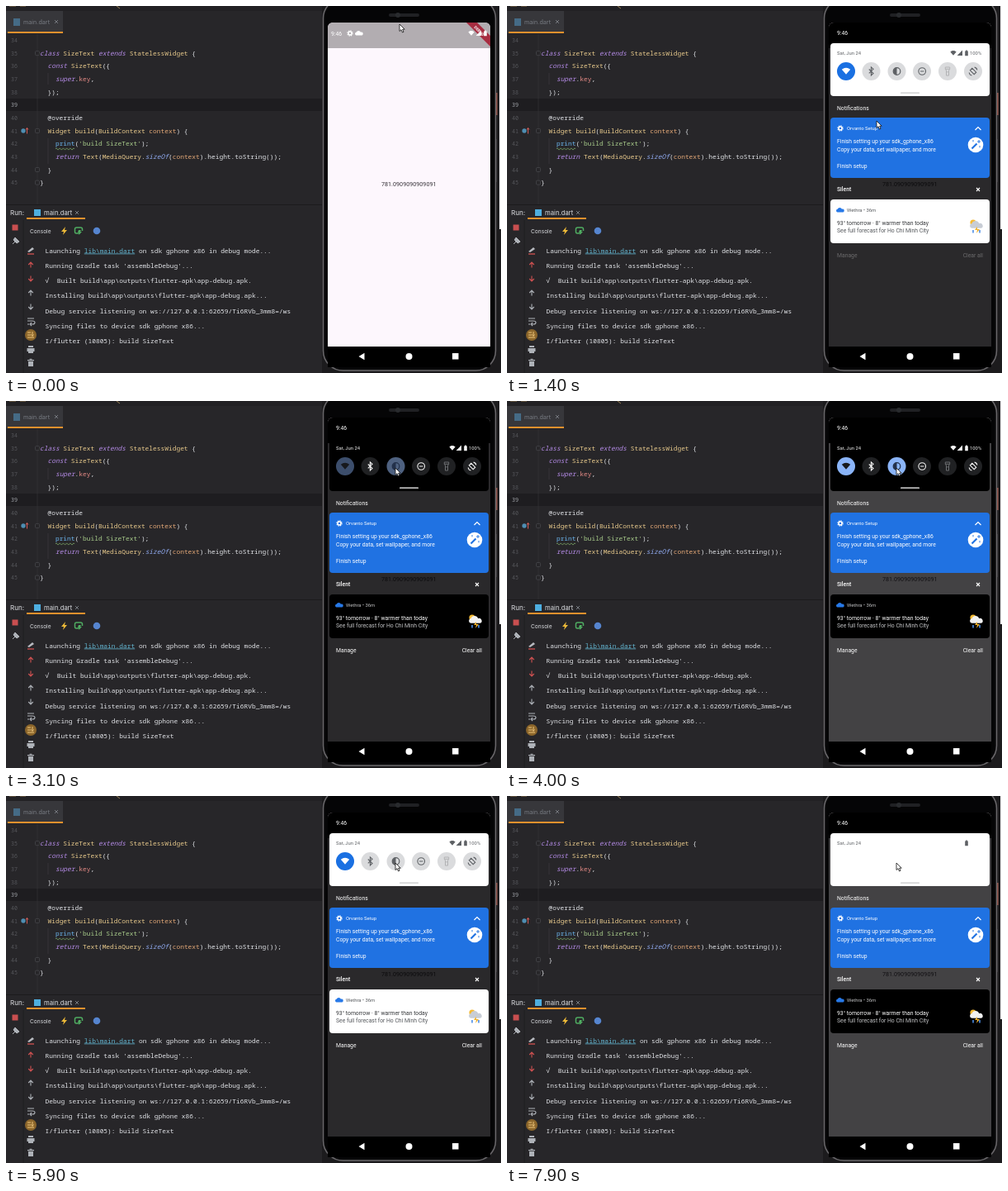
Recreate the animation shown at these times as an HTML page. Size 600 px wide and 444 px high, loop 8 s.

```html
<!DOCTYPE html>
<html lang="en">
<head>
<meta charset="utf-8">
<title>Phone theme toggle beside a code editor</title>
<style>
html, body { margin: 0; width: 100%; height: 100%; overflow: hidden; background: #272629; }
svg { display: block; width: 600px; height: 444px; }
text { white-space: pre; }
.mono { font: 500 7.88px "Noto Sans Mono", "DejaVu Sans Mono", monospace; fill: #e2e4e8; }
.num { font: 6.6px "Noto Sans Mono", monospace; fill: #55565b; }
.ui { font: 8.1px Inter, sans-serif; fill: #dcdee2; }
.k { fill: #b48be6; font-style: italic; }
.t { fill: #e8ca8c; }
.f { fill: #6cb6f0; }
.m { fill: #8fa9ee; font-style: italic; }
.s { fill: #a9cd8b; }
.r { fill: #e58a86; }
.o { fill: #e3a877; }
.line { fill: none; stroke: #aeb2b8; stroke-width: 1.1; }
.phone text { font: 6.8px Roboto, sans-serif; }
.phone .small { font-size: 5.9px; }
.phone .mid { font-weight: 500; }
.white { fill: #fff; }
.panel { fill: var(--panel); }
.ink { fill: var(--ink); }
.inkline { fill: none; stroke: var(--ink); stroke-width: 1.1; }
.card { fill: var(--card); }
.cardink { fill: var(--cardInk); }
.cardsub { fill: var(--cardSub); }
</style>
</head>
<body>
<svg viewBox="0 0 600 444">
  <defs>
    <clipPath id="screen"><path d="M390 412V27q0-7 7-7H580q7 0 7 7V412Z"/></clipPath>
    <path id="cloud" d="M-3.6 2.4a1.9 1.9 0 0 1 .2-3.7A2.9 2.9 0 0 1 2-1.2a1.8 1.8 0 0 1 1.6 3.6Z"/>
    <path id="wifi" d="M0 3.8L-5.2-2.3Q0-6 5.2-2.3Z"/>
    <path id="signal" d="M3 3V-3.4L-3.4 3Z"/>
    <path id="battery" d="M-1.8 3.2V-2.6H-.8V-3.6H.8V-2.6H1.8V3.2Z"/>
    <g id="gear" fill="none" stroke="currentColor">
      <circle r="2" stroke-width="1.5"/>
      <circle r="3.1" stroke-width="1.2" stroke-dasharray="1.35 1.08"/>
    </g>
    <path id="cross" d="M-2-2L2 2M2-2L-2 2"/>
    <path id="up" d="M0 3.5V-3M-2.8 0L0-3L2.8 0"/>
  </defs>

  <rect width="600" height="444" fill="#272629"/>
  <rect width="600" height="6" fill="#222124"/>
  <path d="M4 0h8M17 0h7M134 0l4 3" stroke="#9a8054"/>
  <rect y="6" width="69" height="27" fill="#37373b"/>
  <rect x="2" y="31" width="67" height="2" fill="#e8912d"/>
  <rect x="9" y="15" width="8" height="9" fill="#456b86"/>
  <text class="ui" x="21" y="22" style="font-size:7.2px;fill:#777b82">main.dart</text>
  <use href="#cross" x="61" y="19" stroke="#74777d"/>
  <rect y="112" width="383" height="15" fill="#1e1d20"/>
  <path d="M38 34V240" stroke="#353438" stroke-width=".7"/>
  <path d="M51 81v14M51 160v31" stroke="#3d3c41" stroke-width=".7"/>
  <g id="code"></g>
  <path d="M60 173q1-2.2 2.1 0t2.1 0 2.1 0 2.1 0 2.1 0 2.1 0 2.1 0 2.1 0 2.1 0 2.1 0 2.1 0" fill="none" stroke="#7ea968" stroke-width=".8"/>
  <circle cx="21" cy="151" r="2.7" fill="#4e8eb2"/>
  <path d="M25.5 154.5v-7M24 149.5l1.5-2 1.5 2" fill="none" stroke="#d05c58"/>

  <rect y="240" width="383" height="1" fill="#1b1a1c"/>
  <rect x="25" y="256" width="71" height="2" fill="#e8912d"/>
  <text class="ui" x="5" y="253">Run:</text>
  <rect x="34" y="246" width="8" height="8" fill="#4daee0"/>
  <text class="ui" x="46" y="253" style="font-size:7.7px">main.dart</text>
  <use href="#cross" x="86" y="250" stroke="#777b82"/>
  <path d="M21 259V444" stroke="#1f1e21"/>
  <text class="ui" x="29" y="275" style="font-size:6.6px">Console</text>
  <path d="M72 267l-5 6h3l-1 4 5-6h-3Z" fill="#edba38"/>
  <path d="M90 275h-5q-1.5 0-1.5-2v-3q0-2 2-2h5q2 0 2 2v2" fill="none" stroke="#50ad62" stroke-width="1.5"/>
  <path d="M88 271l-1 3h2l-1 3 4-4h-2l1-2Z" fill="#50ad62"/>
  <circle cx="110" cy="272" r="4.3" fill="#5685cf"/>
  <rect x="7.5" y="264.5" width="7" height="7" fill="#c94f50"/>
  <path d="M8 288l3-3M9 282l5 5M11 280l5 5-3 2-4-4Z" fill="#aeb2b8" stroke="#aeb2b8"/>
  <path d="M26 297l6-5 2 2-6 4Z" fill="#b8bbc1"/><path d="M26 300h8" stroke="#d25252" stroke-width="1.3"/>
  <g class="line">
    <g stroke="#d25252"><use href="#up" x="30" y="313"/><use href="#up" transform="translate(30 330) scale(1 -1)"/></g>
    <use href="#up" x="30" y="347"/><use href="#up" transform="translate(30 364) scale(1 -1)"/>
    <path d="M26 378h8M26 381h6q3 0 3 2t-3 2h-2M31 383l-2 2 2 2M26 385h2"/>
  </g>
  <circle cx="30" cy="398" r="7" fill="#8c662b"/>
  <path d="M26 395h4M26 398h4M26 401h8M32 394v5M30.5 397.5l1.5 2 1.5-2" fill="none" stroke="#ecc47b"/>
  <path d="M27 411h6v2h-6ZM25.5 414h9v4h-9ZM27 417h6v3h-6Z" fill="#aeb2b8"/>
  <path d="M26 428h8v1.3h-8ZM28.5 426.7h3v1h-3ZM27 430h6v6h-6Z" fill="#aeb2b8"/>
  <g id="log"></g>

  <g class="phone">
    <rect x="383" width="217" height="444" fill="#1c1b1d"/>
    <rect x="598" width="2" height="270" fill="#f4f2f4"/>
    <rect x="593" y="105" width="2.5" height="27" fill="#9c5549"/>
    <rect x="593" y="161" width="2" height="52" fill="#343235"/>
    <rect x="384.5" y="-9" width="209" height="450" rx="24" fill="#09090a" stroke="#6b696c" stroke-width="1.5"/>
    <rect x="387" y="-6" width="204" height="444" rx="21" fill="#050506"/>
    <rect x="464" y="9" width="37" height="4" rx="2" fill="#202124"/>
    <circle cx="475" cy="11" r="3" fill="#292b2e"/>

    <g clip-path="url(#screen)">
      <rect x="390" y="20" width="197" height="392" fill="#fdf7fd"/>
      <text x="455" y="218" fill="#38343a" style="font-size:7.2px">781.0909090909091</text>
      <rect x="390" y="20" width="197" height="31" fill="#b2adb1"/>
      <path d="M558 20h13L587 36v13Z" fill="#a72c40"/>
      <text class="white" transform="translate(567 26) rotate(45)" style="font-size:4.7px;font-weight:700">DEBUG</text>
      <g id="bar" class="white" color="#fff">
        <text x="394" y="35.5">9:46</text>
        <use href="#gear" x="417" y="33"/><use href="#cloud" x="428" y="33"/>
        <use href="#wifi" transform="translate(564 33) scale(.7)"/>
        <use href="#signal" x="573" y="33"/><use href="#battery" x="581" y="33"/>
      </g>
      <rect id="scrim" x="390" y="20" width="197" height="392" fill="#020203"/>
      <g id="head">
        <rect x="390" y="20" width="197" height="31" fill="#000"/>
        <text class="white" x="400" y="35.3">9:46</text>
      </g>

      <g id="panel">
        <rect class="panel" x="392" y="45" width="193" height="64" rx="4"/>
        <text class="ink small" x="400" y="59">Sat, Jun 24</text>
        <g id="net" class="ink">
          <use href="#wifi" transform="translate(541 57) scale(.7)"/><use href="#signal" x="549" y="57"/>
        </g>
        <use href="#battery" class="ink" x="557" y="57"/>
        <text id="percent" class="ink small" x="561" y="59">100%</text>
        <g id="discs" fill="var(--disc)">
          <circle cx="441.5" cy="79" r="11"/><circle cx="503" cy="79" r="11"/>
          <circle cx="534" cy="79" r="11"/><circle cx="565" cy="79" r="11"/>
          <circle cx="472.5" cy="79" r="11"/>
        </g>
        <circle id="wifiDisc" cx="411" cy="79" r="11" fill="var(--active)"/>
        <circle id="themeDisc" cx="472.5" cy="79" r="11" fill="#8ab4f8"/>
        <use href="#wifi" x="411" y="79" fill="var(--activeInk)"/>
        <g id="icons">
          <path class="inkline" d="M438.8 76.5l5.2 5-2.6 2.4v-10l2.6 2.4-5.2 5"/>
          <circle cx="472.5" cy="79" r="4.3" fill="none" stroke="var(--themeInk)" stroke-width="1.2"/>
          <path d="M472.5 74.7a4.3 4.3 0 0 0 0 8.6Z" fill="var(--themeInk)"/>
          <path class="inkline" d="M498.9 79a4.3 4.3 0 1 0 8.6 0a4.3 4.3 0 1 0-8.6 0M501 79h4.4"/>
          <path d="M531.3 74h5.4v2.3l-1.2 1.8v6h-3v-6l-1.2-1.8ZM531.3 76.3h5.4M534 79v1.6" fill="none" stroke="var(--dimInk)"/>
          <path class="inkline" d="M561.3 77.8l2.5-2.5 4.9 4.9-2.5 2.5ZM560.2 80.5q.4 3 3.2 3.4M569.8 77.5q-.4-3-3.2-3.4"/>
        </g>
        <rect x="477" y="104.6" width="23" height="1.2" rx=".6" fill="var(--handle)"/>
      </g>

      <g id="notes">
        <text id="label" class="white" x="400" y="126">Notifications</text>
        <g id="folded" color="#555">
          <rect x="392" y="124" width="193" height="16" rx="4" fill="#fff"/>
          <use href="#gear" x="404" y="132"/><use href="#cloud" x="415" y="132" fill="#1a73e8"/>
        </g>
        <g id="cards" color="#fff">
          <g class="white">
            <rect x="392" y="135" width="193" height="73" rx="4" fill="#2072e2"/>
            <use href="#gear" x="404" y="148"/>
            <text class="small" x="412" y="150">Orvanto Setup</text>
            <path d="M567.5 150l3.5-3.5 3.5 3.5" fill="none" stroke="#fff" stroke-width="1.2"/>
            <text x="400" y="166">Finish setting up your sdk_gphone_x86</text>
            <text x="400" y="175.6">Copy your data, set wallpaper, and more</text>
            <text x="400" y="195.5">Finish setup</text>
            <circle cx="568" cy="168" r="9.3"/>
            <path d="M563.5 172.5l6-6" stroke="#2072e2" stroke-width="2.2"/>
            <path d="M572 162v4M570 164h4M565 162v2.4M573 169v2.4" stroke="#2072e2" stroke-width=".9"/>
            <text class="mid" x="400" y="224.3">Silent</text>
            <use href="#cross" x="571" y="222" stroke="#fff" stroke-width="1.1"/>
          </g>
          <rect class="card" x="392" y="234" width="193" height="53" rx="4"/>
          <use href="#cloud" x="404" y="247" fill="#2779e8"/>
          <text class="cardsub small" x="412" y="249">Wethra • 36m</text>
          <text class="cardink" x="400" y="264.5">93° tomorrow · 8° warmer than today</text>
          <text class="cardsub" x="400" y="274">See full forecast for Ho Chi Minh City</text>
          <circle cx="565" cy="262" r="3.6" fill="#f5bb35"/>
          <use href="#cloud" transform="translate(569 265) scale(1.6)" fill="var(--cloud)"/>
          <path d="M565 271v3.5M573 271v3.5" stroke="#4a8de8" stroke-width="1.6"/>
          <path d="M570 267l-3 4h3l-1 4 4-5h-3Z" fill="#f0b22c"/>
          <g id="foot" class="white">
            <text x="400" y="304">Manage</text><text x="577" y="304" text-anchor="end">Clear all</text>
          </g>
        </g>
      </g>
    </g>

    <rect x="390" y="412" width="197" height="25" fill="#000"/>
    <g class="white">
      <path d="M427.5 424l7-4.3v8.6Z"/><circle cx="488.5" cy="424" r="4"/><rect x="541" y="420" width="7.5" height="7.5"/>
    </g>
  </g>
  <path id="cursor" d="M0 0V8.5L2 6.7 3.5 10 5 9.3 3.6 6.2H6.2Z" fill="#fff" stroke="#111" stroke-width=".8"/>
</svg>
<script>
const $ = id => document.getElementById(id);
const svg = document.querySelector('svg');

// «class|words» marks a coloured span.
const paint = s => s.replace(/«(\w+)\|([^»]+)»/g, '<tspan class="$1">$2</tspan>');
const code = [
  '', '«k|class» «t|SizeText» «k|extends» «t|StatelessWidget» {',
  '  «k|const» «t|SizeText»({', '    «k|super».«r|key»,', '  });', '',
  '  @override', '  «t|Widget» «t|build»(«t|BuildContext» «o|context») {',
  "    «f|print»(«s|'build SizeText'»);",
  '    «k|return» «t|Text»(«t|MediaQuery».«m|sizeOf»(«o|context»).height.toString());',
  '  }', '}'
];
$('code').innerHTML = code.map((s, i) => {
  const y = 44 + i * 15.65;
  const fold = [1, 7, 10, 11].includes(i)
    ? `<rect x="35.5" y="${y - 5}" width="5" height="5" rx="1" fill="#272629" stroke="#4b4b50" stroke-width=".7"/>` : '';
  return `<text class="num" x="6" y="${y}"${i == 5 ? ' style="fill:#a0a3a8"' : ''}>${34 + i}</text>${fold}` +
    `<text class="mono" x="41" y="${y}">${paint(s)}</text>`;
}).join('');

const log = [
  'Launching <tspan fill="#63b4cf" text-decoration="underline">lib\\main.dart</tspan> on sdk gphone x86 in debug mode...',
  "Running Gradle task 'assembleDebug'...",
  '√  Built build\\app\\outputs\\flutter-apk\\app-debug.apk.',
  'Installing build\\app\\outputs\\flutter-apk\\app-debug.apk...',
  'Debug service listening on ws://127.0.0.1:62659/Ti6RVb_3mm8=/ws',
  'Syncing files to device sdk gphone x86...',
  'I/flutter (10805): build SizeText'
];
$('log').innerHTML = log.map((s, i) =>
  `<text class="mono" x="47.5" y="${298.5 + i * 18.33}">${s}</text>`).join('');

// Linear track through [time, value] pairs, held at both ends.
function track(t, ...keys) {
  let [pt, pv] = keys[0];
  if (t <= pt) return pv;
  for (const [kt, kv] of keys) {
    if (t < kt) return pv + (kv - pv) * (t - pt) / (kt - pt);
    pt = kt; pv = kv;
  }
  return pv;
}
const fade = (id, v) => $(id).setAttribute('opacity', Math.max(0, Math.min(1, v)));
const move = (id, x, y) => $(id).setAttribute('transform', `translate(${x} ${y})`);
const within = (t, a, b) => t >= a && t < b;

function draw(t) {
  const open = track(t, [100, 0], [900, 1]);
  const grow = track(t, [900, 0], [1300, 1]);
  const dark = within(t, 2900, 4800) || within(t, 6600, 7900);
  const darkCard = within(t, 2900, 5100) || t >= 6600;
  const sinceDark = t >= 6600 ? t - 6600 : t - 2900;
  const sinceLight = t >= 7900 ? t - 7900 : t >= 4800 ? t - 4700 : 9999;

  move('cursor',
    track(t, [1000, 477], [1400, 448], [1800, 448], [2300, 472]),
    track(t, [0, 22], [100, 23], [900, 206], [1000, 210], [1400, 139], [1800, 112], [2300, 81]));

  fade('bar', 1 - open * 2);
  fade('head', open * 1.6);
  move('panel', 0, -92 * (1 - open));
  fade('panel', open * 4);
  fade('notes', open * 2 - 1);
  move('label', 0, -8 * (1 - grow));
  fade('folded', 1 - grow * 2);
  fade('cards', grow);
  move('cards', 0, -11 * (1 - grow));
  fade('foot', track(t, [1300, .2], [1400, .3], [1800, 1]));
  fade('scrim', t < 1400
    ? .46 * open + .38 * grow
    : track(t, [3300, .84], [3700, .738], [5000, .738], [5500, .84], [6900, .84], [7200, .738]));

  const activeIn = dark ? .1 + sinceDark / 600 : (sinceLight - 100) / 400;
  fade('wifiDisc', activeIn);
  fade('themeDisc', dark ? activeIn : 0);
  fade('discs', dark ? 1 : (sinceLight - 100) / 400);
  fade('icons', dark ? 1 : sinceLight / 100);
  fade('net', dark ? 1 : (sinceLight - 100) / 200);
  fade('percent', dark ? 1 : sinceLight / 100);

  const vars = {
    panel: dark ? '#000' : '#fff',
    ink: dark ? '#f5f5f5' : '#5d6064',
    dimInk: dark ? '#6b6d70' : '#b2b3b5',
    disc: dark ? '#202123' : '#dadbdd',
    active: dark ? '#8ab4f8' : '#1a70e2',
    activeInk: dark ? '#17191d' : '#fff',
    themeInk: dark ? '#22304a' : '#5d6064',
    handle: dark ? '#fff' : '#c5c6c8',
    card: darkCard ? '#000' : '#fff',
    cardInk: darkCard ? '#fff' : '#35373a',
    cardSub: darkCard ? '#c3c4c6' : '#55585c',
    cloud: darkCard ? '#f1f1f1' : '#c8cdd5'
  };
  for (const name in vars) svg.style.setProperty('--' + name, vars[name]);
}

const start = performance.now();
function tick() {
  const t = (performance.now() - start) % 8000;
  draw(Math.floor(t / 100) * 100);
  requestAnimationFrame(tick);
}
tick();
</script>
</body>
</html>
```
